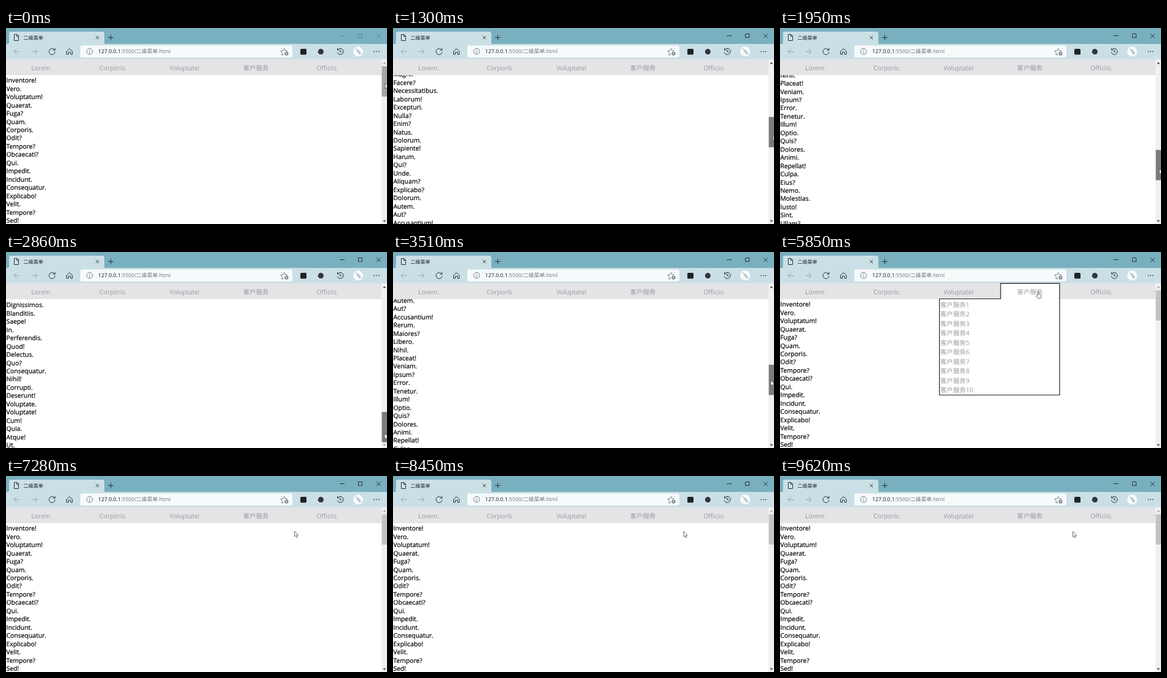
These frames come from a looping animation (620 by 320 pixels, 9750 ms). An HTML page:

```html
<!DOCTYPE html>
<html lang="zh">
<head>
<meta charset="utf-8">
<title>二级菜单</title>
<style>
  html, body { margin: 0; width: 100%; height: 100%; overflow: hidden; background: #fff; }
  svg { display: block; width: 620px; height: 320px; }
  text {
    font: 10.35px "Open Sans", "Noto Sans CJK SC", "Noto Sans CJK", "Noto Sans", sans-serif;
    text-rendering: geometricPrecision;
  }
  #list text { stroke: #000; stroke-width: .2; }
  .grey text { fill: #97999c; }
  .mid { text-anchor: middle; }
  .line { fill: none; stroke: #263238; stroke-width: 1; }
</style>
</head>
<body>
<svg viewBox="0 0 620 320">
  <rect width="620" height="320" fill="#fff"/>
  <g id="list"></g>

  <!-- scrollbar -->
  <rect x="611" y="51" width="9" height="269" fill="#f0f0f1"/>
  <rect id="thumb" x="611.5" y="62.5" width="8.5" height="49.5"/>
  <path id="up" d="M613.3 58.7L615.8 55.6L618.3 58.7Z"/>
  <path id="down" d="M613.3 313.8L615.8 316.9L618.3 313.8Z"/>

  <!-- browser window -->
  <rect width="620" height="27" fill="#79b0c0"/>
  <rect y="26" width="620" height="25" fill="#cbe0e6"/>
  <path d="M1 27Q5 27 5 23V9Q5 6 8 6H157Q160 6 160 9V23Q160 27 164 27Z" fill="#cbe0e6"/>
  <rect x="121" y="28.5" width="345" height="19.5" rx="3" fill="#f6fafb"/>
  <g class="line">
    <path d="M13.5 10.5H18L20.5 13V20.5H13.5ZM17.5 10.5V13.5H20.5"/>
    <path d="M146.2 13.2L151.2 18.2M151.2 13.2L146.2 18.2M166 15.5H175M170.5 11V20"/>
    <path id="controls" d="M543 12.5H551M573.5 9.5H579.5V15.5H573.5ZM603 9.3L609.8 16.1M609.8 9.3L603 16.1"/>
    <path stroke="#90a9b2" d="M23 38.5H13M17.5 34L13 38.5L17.5 43M41 38.5H51M46.5 34L51 38.5L46.5 43"/>
    <path d="M79.3 36A5 5 0 1 0 80 39M79.8 33V36.3H76.5"/>
    <path d="M98.5 38L103.2 33.8L108 38V43H105V39.5H101.5V43H98.5Z"/>
    <g stroke="#707b80">
      <circle cx="136" cy="38.3" r="4.8"/>
      <path d="M136 37.5V41M136 35.3V36.3"/>
      <path d="M452.5 43L449 44.2L449.5 40.5L447 37.7L450.8 37L452.7 33.5L454.5 37L458.2 37.7"/>
      <circle cx="456.5" cy="41.8" r="2.6" fill="#707b80"/>
      <path stroke="#fff" stroke-width=".8" d="M455 41.8H458M456.5 40.3V43.3"/>
    </g>
    <path d="M540 35.5A5 5 0 1 1 539.2 39.5M539.5 33V36H542.5M544 35.5V39H546.5"/>
  </g>
  <rect x="479" y="34" width="10" height="9.5" rx="1.5" fill="#202326"/>
  <circle cx="512.3" cy="38.7" r="4.6" fill="#30383c"/>
  <circle cx="573" cy="38.3" r="8" fill="#f8fafb"/>
  <path d="M568 33L574 36L578 41L575 44L572 39Z" fill="#b5c6ce"/>
  <path d="M598.5 38.5h1.6m2.2 0h1.6m2.2 0h1.6" stroke="#263238" stroke-width="1.6"/>
  <text x="28.5" y="18.5" style="font-size:8px" fill="#10181c">二级菜单</text>
  <text x="150" y="41.4" style="font-size:8.7px" fill="#687176"><tspan fill="#11181c">127.0.0.1</tspan>:5500/二级菜单.html</text>

  <!-- page navigation -->
  <rect y="51" width="611" height="26" fill="#e3e4e6"/>
  <g id="menu">
    <path d="M359 76.5V51.3H455V233.5H259.5V76.5Z" fill="#fff" stroke="#222" stroke-width="1.2"/>
    <g id="items" class="grey"></g>
  </g>
  <g id="nav" class="grey mid"></g>

  <!-- pointer -->
  <g id="pointer" fill="#fff" stroke="#444" stroke-width=".75" stroke-linejoin="round">
    <path id="arrow" d="M0 0V9L2 7.2L3.5 10.3L5 9.6L3.6 6.7H6.2Z"/>
    <path id="hand" d="M-.9 .6Q0-.5 .9 .6V4L4.5 4.8Q5.4 5 5.2 6.5L4.4 10.5H-.7L-3.2 6.8Q-2.8 5.6-.9 7Z"/>
  </g>
</svg>
<script>
const $ = id => document.getElementById(id);
const LOOP = 9750, STEP = 130, SCROLL_RATIO = 5.48, MAX_TRAVEL = 198.6;

const words = `Inventore! Vero. Voluptatum! Quaerat. Fuga? Quam. Corporis. Odit? Tempore? Obcaecati?
Qui. Impedit. Incidunt. Consequatur. Explicabo! Velit. Tempore? Sed! Unde. Aperiam.
Accusantium. Delectus! Porro? Fuga! Eaque. Deserunt! Laboriosam. Commodi! Quos. Itaque!
Ratione. Minima? Soluta. Magni. Facere? Necessitatibus. Laborum! Excepturi. Nulla? Enim?
Natus. Dolorum. Sapiente! Harum. Qui? Unde. Aliquam? Explicabo? Dolorum. Autem.
Aut? Accusantium! Rerum. Maiores? Libero. Nihil. Placeat! Veniam. Ipsum? Error.
Tenetur. Illum! Optio. Quis? Dolores. Animi. Repellat! Culpa. Eius? Nemo.
Molestias. Iusto! Sint. Ullam? Beatae. Ea. Asperiores! Modi. Vitae? Totam.
Harum. Dignissimos. Blanditiis. Saepe! In. Perferendis. Quod! Delectus. Quo? Consequatur.
Nihil! Corrupti. Deserunt! Voluptate. Voluptate! Cum! Quia. Atque! Ut.`.split(/\s+/);

function addText(parent, x, y, content) {
  const el = document.createElementNS("http://www.w3.org/2000/svg", "text");
  el.setAttribute("x", x);
  el.setAttribute("y", y);
  el.textContent = content;
  $(parent).append(el);
}
words.forEach((word, i) => addText("list", 0.5, 89.3 + 13.45 * i, word));
["Lorem.", "Corporis.", "Voluptate!", "客户服务", "Officiis."]
  .forEach((label, i) => addText("nav", 58 + 116.25 * i, 68.7, label));
for (let i = 0; i < 10; i++) addText("items", 261, 89.7 + 15.5 * i, "客户服务" + (i + 1));

// Keys: time, then values
const travelKeys = [[0, 0], [200, 0], [1300, 82.8], [2700, MAX_TRAVEL], [2990, MAX_TRAVEL], [4160, 25], [4420, 0]];
const pointerKeys = [
  [0, 617, 90], [200, 617, 91], [1300, 618.5, 175], [2700, 616, 293], [2860, 616, 296],
  [2990, 616, 292], [4160, 613, 106], [4420, 613, 82], [4900, 610, 80], [5460, 448, 72],
  [5850, 420, 65], [6240, 412, 100], [6630, 420, 110], [7020, 460, 96], [7280, 469.5, 90],
  [9620, 476.5, 90.5]
];

function sample(keys, t) {
  const next = keys.findIndex(key => key[0] > t);
  if (next < 0) return keys.at(-1).slice(1);
  const a = keys[next - 1], b = keys[next], k = (t - a[0]) / (b[0] - a[0]);
  return a.slice(1).map((v, i) => v + (b[i + 1] - v) * k);
}

function show(id, visible) {
  $(id).setAttribute("visibility", visible ? "visible" : "hidden");
}

function draw() {
  const t = Math.floor(performance.now() % LOOP / STEP) * STEP;
  const [travel] = sample(travelKeys, t);
  const [x, y] = sample(pointerKeys, t);
  const open = t > 5400 && x > 359 && x < 455;

  $("list").setAttribute("transform", `translate(0 ${-travel * SCROLL_RATIO})`);
  $("thumb").setAttribute("transform", `translate(0 ${travel})`);
  $("thumb").setAttribute("fill", t < STEP ? "#a6a6a6" : t < 4420 ? "#7b7d7d" : "#c1c3c6");
  $("up").setAttribute("fill", travel > 0 ? "#505050" : "#a5a5a5");
  $("down").setAttribute("fill", travel < MAX_TRAVEL ? "#505050" : "#a5a5a5");
  $("controls").setAttribute("stroke", t < STEP ? "#568492" : "#263238");
  $("pointer").setAttribute("transform", `translate(${x} ${y})`);
  show("menu", open);
  show("hand", open);
  show("arrow", !open);
  requestAnimationFrame(draw);
}
draw();
</script>
</body>
</html>
```
